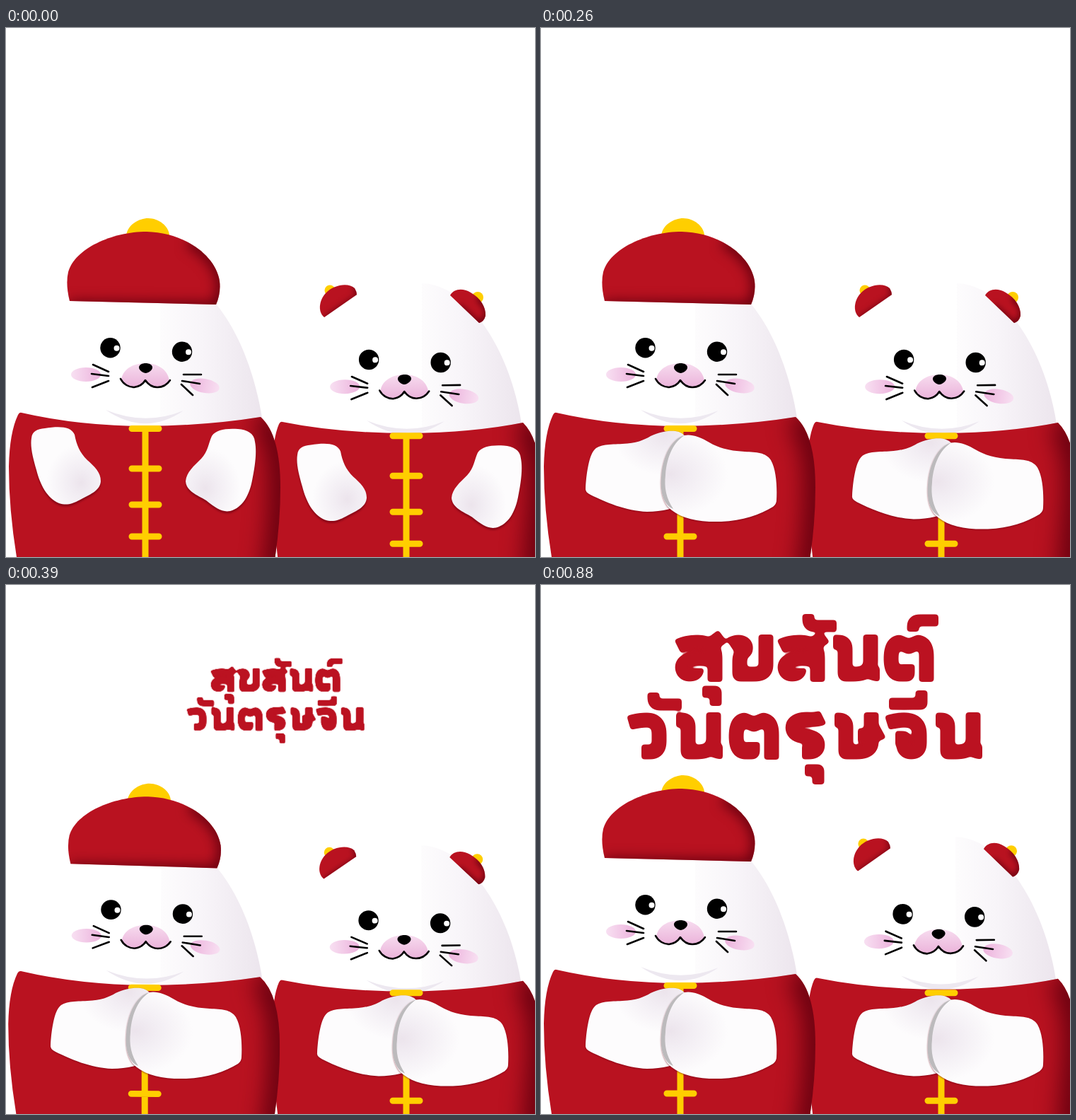
Animation, 748 px wide and 748 px high, one loop 1040 ms. Source, as an HTML page:

```html
<!DOCTYPE html>
<html lang="th">
<head>
<meta charset="utf-8">
<title>สุขสันต์วันตรุษจีน</title>
<style>
html, body { margin: 0; width: 100%; height: 100%; overflow: hidden; background: #fff }
svg { display: block; width: 100vw; height: 100vh }
.red { fill: #b91220 }
.gold { fill: #ffce00 }
.line { fill: none; stroke: #000; stroke-width: 2.6; stroke-linecap: round; stroke-linejoin: round }
.shade { fill: none; stroke: #65000f }
.frog { fill: none; stroke: #ffce00; stroke-width: 9; stroke-linecap: round }
.letters { fill: none; stroke: #bb1221; stroke-width: 21; stroke-linejoin: round }
.mark { stroke-width: 17 }
</style>
</head>
<body>
<svg id="stage" viewBox="0 0 748 748"></svg>
<script>
const STEP = 130, LOOP = 1040;
let ids = 0;

const path = (d, attrs) => `<path d="${d}" ${attrs}/>`;
const shift = (x, y, body) => `<g transform="translate(${x} ${y})">${body}</g>`;
const group = (id, body) => `<g id="${id}">${body}</g>`;

// Red shape with a soft dark rim along one edge.
function cloth(d, edge, width, blur) {
  const id = 'c' + ids++;
  return `<clipPath id="${id}">${path(d, '')}</clipPath>${path(d, 'class="red"')}
    <g clip-path="url(#${id})">${path(edge, `class="shade" stroke-width="${width}" style="filter:blur(${blur}px)"`)}</g>`;
}

function arm({ d, cx, cy, dx, dy }) {
  const id = 'a' + ids++;
  return `<radialGradient id="${id}" cx="${cx}" cy="${cy}" r=".5">
    <stop stop-color="#ece4ec"/><stop offset=".35" stop-color="#f2edf3"/><stop offset="1" stop-color="#fdfcfd"/>
    </radialGradient>${path(d, `fill="url(#${id})" style="filter:drop-shadow(${dx}px ${dy}px 1px #70001099)"`)}`;
}

// The "soft" filter rounds the corners of the lettering.
const defs = `<defs>
  <linearGradient id="skin">
    <stop stop-color="#fdfcfd"/><stop offset=".4" stop-color="#f8f5f9"/><stop offset="1" stop-color="#ece5ed"/>
  </linearGradient>
  <linearGradient id="muzzle" x2="0" y2="1"><stop stop-color="#f7dcef"/><stop offset="1" stop-color="#ebb3da"/></linearGradient>
  <linearGradient id="blush"><stop stop-color="#f8e0f2"/><stop offset="1" stop-color="#ecb2dc"/></linearGradient>
  <linearGradient id="blush2"><stop stop-color="#ecb2dc"/><stop offset="1" stop-color="#f8e0f2"/></linearGradient>
  <filter id="soft" color-interpolation-filters="sRGB">
    <feGaussianBlur stdDeviation="2.2"/>
    <feComponentTransfer><feFuncA type="linear" slope="6" intercept="-2.5"/></feComponentTransfer>
  </filter>
</defs>`;

const eye = (x, y) => `<circle cx="${x}" cy="${y}" r="14.2"/><circle cx="${x + 9}" cy="${y + .5}" r="4" fill="#fff"/>`;

const face = `
  <ellipse cx="113" cy="490" rx="21" ry="10" fill="url(#blush)"/>
  <ellipse cx="281" cy="506" rx="21" ry="10" fill="url(#blush2)" transform="rotate(10 281 506)"/>
  ${eye(147.5, 452.3)}${eye(249, 457.7)}
  ${path('M163 497C166 480 183 474 197 474C213 474 229 482 231 499C227 505 219 508 214 508C205 508 200 504 197 498C193 505 187 508 179 507C171 506 165 502 163 497Z', 'fill="url(#muzzle)"')}
  ${path('M162 496C166 504 174 508 181 508C189 507 194 503 197 498C201 504 207 508 214 508C222 508 228 504 232 498', 'class="line"')}
  ${path('M188 480C188 472 207 472 207 480C207 484 201 488 197.5 488C194 488 188 484 188 480Z', '')}
  ${path('M123 476L145 486M121 489L145 492M122 508L145 499M251 490H276M249 499L274 503M248 504L264 519', 'class="line"')}`;

const chin = path('M141 540Q197 578 251 541Q197 563 141 540Z', 'fill="#ede8f0"');
const frogs = path('M197 567V770M178 566.5H216M178 623H216M178 674H216M178 719H216', 'class="frog"');

const tallHead = `
  ${path('M218 385L296 389C330 430 352 490 362 551V570H218Z', 'fill="url(#skin)"')}
  ${path('M170 293C172 278 188 269 201 269C216 269 230 280 231 293Z', 'class="gold"')}
  ${cloth('M90 386Q84 362 88 345C97 312 150 288 199 288C250 289 296 320 302 358Q304 375 297 391Z',
    'M90 396L300 398Q312 370 306 350Q295 318 260 300', 20, 9)}
  ${face}${chin}`;

const tallBody = `
  ${cloth('M22 544Q105 563 200 563Q285 562 360 550Q388 575 388 650Q388 700 380 752V770H18L15 748Q4 680 4 620Q5 572 17 547Q19 543 22 544Z',
    'M362 550Q392 575 392 650Q392 710 380 780', 40, 16)}
  ${frogs}`;

const smallHead = `
  ${path('M588 361C650 362 712 450 729 560V578H588Z', 'fill="url(#skin)"')}
  <circle class="gold" cx="458" cy="371" r="7.5"/><circle class="gold" cx="667" cy="381" r="8"/>
  ${cloth('M450 409C441 402 442 386 452 375C464 362 485 360 493 368Q496 373 496 377Z', 'M452 412L500 379L494 364', 7, 4)}
  ${cloth('M628 378C633 369 645 367 657 374C671 382 679 395 678 407Q676 415 669 417Z', 'M640 394L669 420Q684 410 680 396L668 380', 8, 4)}
  ${shift(366, 16, `<g transform="rotate(-.8 197 480)">${face}</g>`)}${shift(369, 15, chin)}`;

const smallBody = cloth('M391 557Q470 573 570 573Q660 572 731 558Q758 585 757 660Q756 720 749 770H387Q376 690 376 630Q377 580 386 560Q388 556 391 557Z',
  'M735 556Q762 585 761 660L752 780', 42, 16);

// Arm poses: open, raised, palms together; x and y place the second pair.
const poses = [
  { x: 376, y: 23.5, arms: [
    { d: 'M36 580C37 570 44 567 55 566C75 563 92 563 97 575C100 590 104 600 115 611C125 620 134 628 134 641C133 655 117 660 105 667C92 674 85 675 75 672C58 665 48 645 43 625C38 608 34 592 36 580Z',
      cx: .72, cy: .72, dx: 0, dy: 3 },
    { d: 'M352 585C351 573 341 568 328 567C310 566 297 568 291 577C286 588 286 598 276 609C266 619 255 628 254 641C255 655 270 660 283 668C297 679 305 685 317 683C335 678 344 660 348 640C352 620 355 600 352 585Z',
      cx: .28, cy: .72, dx: 0, dy: 3 }] },
  { x: 375.7, y: 15, arms: [
    { d: 'M43 641C45 620 47 604 56 598C68 592 85 595 101 594C113 590 125 580 137 579.5C150 580 156 595 156 610C157 630 154 648 145 655C132 664 118 666 102 665C80 663 60 655 48 648Q43 645 43 641Z',
      cx: .78, cy: .22, dx: 2, dy: 1 },
    { d: 'M356 655C357 640 356 620 349 609C344 601 333 602 322 601C305 600 298 599 290 593C281 586 272 582 263 583C250 584 240 598 238 614C236 632 238 648 246 657C258 668 278 675 300 675C320 674 340 668 352 660Q356 658 356 655Z',
      cx: .15, cy: .4, dx: -2, dy: 1 }] },
  { x: 377, y: 10.5, arms: [
    { d: 'M63 651C64 630 68 605 75 597C82 588 98 589 115 588C135 587 145 583 155 577C168 571 180 569 190 570Q200 571 206 580V670C190 679 172 684 150 684C120 683 90 670 70 660Q62 656 63 651Z',
      cx: .78, cy: .05, dx: 0, dy: 1 },
    { d: 'M333 668C334 650 333 625 325 611C318 600 305 600 288 599C265 598 250 593 238 586C225 578 212 574 203 576C185 580 172 605 170 635C168 660 175 675 185 682C200 694 225 699 255 698C285 697 310 688 328 677Q333 673 333 668Z',
      cx: .08, cy: .45, dx: 0, dy: 1 }],
    rim: path('M203 576C185 580 172 605 170 635C168 660 175 675 187 680C177 665 174 650 176 632C178 605 188 585 203 576Z', 'fill="#bcbabc"') }
];

function poseMarkup({ x, y, arms, rim = '' }) {
  const pair = arms.map(arm).join('') + rim;
  return `<g class="pose">${pair}${shift(x, y, pair)}</g>`;
}

// None of the installed families covers Thai, so the lettering is stroked.
const glyphs = {
  'ส': 'M4 17Q16 11 32 11Q57 11 57 32V67M57 38Q42 32 28 34Q11 37 11 47Q12 56 22 56Q31 56 31 48M52 14L68 2',
  'ข': 'M3 15Q9 11 16 11Q27 12 25 22Q17 28 17 36V56H38Q54 56 54 44V0',
  'น': 'M2 11H10Q19 11 19 20V56H32Q54 56 55 40V0M48 48Q57 56 68 56',
  'ต': 'M34 42V56H22Q11 54 11 34Q11 13 22 11L36 17L50 11Q61 13 61 30V67',
  'ว': 'M2 15Q16 11 28 11Q45 11 45 30V42Q45 56 32 56H20',
  'ร': 'M54 7Q46 11 32 10Q11 10 11 22Q12 33 28 34Q46 35 46 46Q46 56 34 56H24',
  'ษ': 'M3 11H9Q19 11 19 20V56H34Q55 56 55 42V0M36 33H46Q60 33 71 27',
  'จ': 'M3 15Q16 11 28 11Q49 11 49 30V44Q49 56 38 56Q27 56 27 46V37H15'
};
const marks = {
  'ุ': 'M0 8H19V28',
  'ั': 'M9 0V8Q9 17 18 17H49',
  '์': 'M9 24V16Q9 8 18 8H45',
  'ี': 'M0 19H46V0'
};
const greeting = [
  ['ส', 189, 70], ['ุ', 228, 143], ['ข', 264, 70], ['ส', 334, 70], ['ั', 369, 41], ['น', 411, 70], ['ต', 484, 70], ['์', 517, 42],
  ['ว', 122, 180], ['ั', 150, 152], ['น', 189, 180], ['ต', 265, 180], ['ร', 345, 180], ['ุ', 373, 254],
  ['ษ', 412, 180], ['จ', 486, 180], ['ี', 492, 149], ['น', 556, 180]
];
const letters = greeting.map(([g, x, y]) =>
  shift(x, y, glyphs[g] ? path(glyphs[g], '') : path(marks[g], 'class="mark"'))).join('');

const stage = document.getElementById('stage');
stage.innerHTML = defs
  + group('smallHead', smallHead) + group('smallBody', smallBody) + shift(369, 10.3, frogs)
  + group('tallHead', tallHead) + group('tallBody', tallBody)
  + poses.map(poseMarkup).join('')
  + `<g id="text" class="letters" filter="url(#soft)" role="img" aria-label="สุขสันต์ วันตรุษจีน">${letters}</g>`;

const el = id => document.getElementById(id);
const poseEls = [...document.querySelectorAll('.pose')];
const show = (node, on) => node.setAttribute('visibility', on ? 'visible' : 'hidden');

// Squash towards the floor by s, with a sideways skew c and a tilt b about x = 200.
function lean(id, s, c, b = 0, dx = 0) {
  el(id).setAttribute('transform', `matrix(1 ${b} ${c} ${1 - s} ${dx - 748 * c} ${748 * s - 200 * b})`);
}

const bow = [0, 0, 0, 1, .55, 0];
const squash = [0, 0, 0, .019, .003, -.013];
const skew = [0, 0, 0, .002, .004, .0055];

function draw(now) {
  const i = Math.min(5, Math.floor(now % LOOP / STEP));
  const k = bow[i];
  lean('tallHead', .0245 * k, -.006 * k, .0065 * k, -.8 * k);
  lean('tallBody', .016 * k, 0, .0065 * k, -.8 * k);
  lean('smallHead', squash[i], skew[i]);
  lean('smallBody', squash[i] / 2, 0);
  poseEls.forEach((node, n) => show(node, n === Math.min(i, 2)));
  show(el('text'), i > 2);
  el('text').setAttribute('transform', i === 3 ? 'translate(194.75 82.75) scale(.5)' : '');
}

const start = performance.now();
function tick() {
  draw(performance.now() - start);
  requestAnimationFrame(tick);
}
tick();
</script>
</body>
</html>
```
